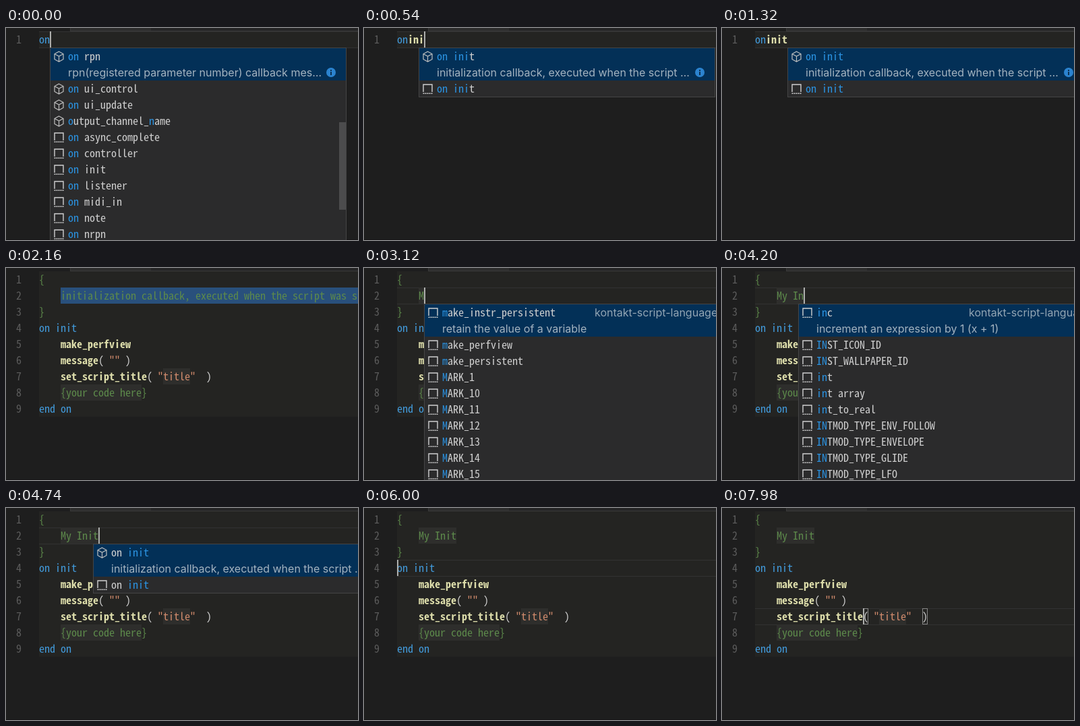
Write an HTML page with a canvas that moves like this. It is 522 px wide and 315 px high and loops after 8000 ms.

```html
<!DOCTYPE html>
<html lang="en">
<head>
<meta charset="utf-8">
<title>Snippet completion</title>
<style>
  html, body { margin: 0; width: 100%; height: 100%; overflow: hidden; background: #1e1e1e; }
  canvas { display: block; }
</style>
</head>
<body>
<canvas id="stage" width="522" height="315"></canvas>
<script>
const ctx = document.getElementById("stage").getContext("2d");
const W = 522, H = 315, LOOP = 8000;
const LEFT = 49, TOP = 5, CHAR = 8, LINE = 24, BASELINE = 18;
const MONO = '"Noto Sans Mono CJK JP", "Noto Sans Mono", monospace';
const SANS = "16px Inter, Roboto, sans-serif";
const BLUE = "#429bdc", GREEN = "#5d8a4b", YELLOW = "#dcdcaa", ORANGE = "#d18b6c", PLAIN = "#d0d0d0";

// Pick the size whose character advance is exactly one cell.
ctx.font = `100px ${MONO}`;
const monoSize = CHAR * 100 / ctx.measureText("0").width;

const colX = col => LEFT + col * CHAR;
const rowY = row => TOP + row * LINE;

// In item names "|" toggles match highlighting (on at the start); "@" asks for the cube icon.
const initDetail = "initialization callback, executed when the script …";
const source = "kontakt-script-language";
const popups = {
  on: {
    detail: "rpn(registered parameter number) callback mes…", info: true, scroll: true,
    items: ["@on| rpn", "@on| ui_control", "@on| ui_update", "@o|utput_channel_|n|ame",
      "on| async_complete", "on| controller", "on| init", "on| listener", "on| midi_in",
      "on| note", "on| nrpn"]
  },
  oni: { detail: initDetail, info: true, items: ["@on i|nit", "on i|nit", "on| m|i|di_in", "@on| u|i|_control"] },
  onin: { detail: initDetail, info: true, items: ["@on in|it", "on in|it", "on| midi_|in"] },
  onini: { detail: initDetail, info: true, items: ["@on ini|t", "on ini|t"] },
  oninit: { detail: initDetail, info: true, items: ["@on init", "on init"] },
  M: {
    detail: "retain the value of a variable", source,
    items: ["m|ake_instr_persistent", "m|ake_perfview", "m|ake_persistent", "M|ARK_1", "M|ARK_10",
      "M|ARK_11", "M|ARK_12", "M|ARK_13", "M|ARK_14", "M|ARK_15"]
  },
  I: {
    detail: "if statement", source,
    items: ["i|f", "i|gnore_controller", "i|gnore_event", "i|gnore_midi", "i|n_range", "i|nc",
      "I|NST_ICON_ID", "I|NST_WALLPAPER_ID", "i|nt", "i|nt array"]
  },
  In: {
    detail: "increment an expression by 1 (x + 1)", source,
    items: ["in|c", "IN|ST_ICON_ID", "IN|ST_WALLPAPER_ID", "in|t", "in|t array", "in|t_to_real",
      "IN|TMOD_TYPE_ENV_FOLLOW", "IN|TMOD_TYPE_ENVELOPE", "IN|TMOD_TYPE_GLIDE", "IN|TMOD_TYPE_LFO"]
  },
  Ini: { detail: initDetail, info: true, items: ["@|on |ini|t", "|on |ini|t"] },
  Init: { detail: initDetail, info: true, items: ["@|on |init", "|on |init"] }
};

// Each step overrides part of the state from its time on.
const steps = [
  [0, { word: "on", row: 0, col: 2, caret: true, popup: "on", left: 2 }],
  [60, { word: "oni", col: 3, popup: "oni" }],
  [120, { left: 3 }],
  [300, { word: "onin", col: 4, popup: "onin" }],
  [360, { left: 4 }],
  [540, { word: "onini", col: 5, popup: "onini" }],
  [600, { left: 5 }],
  [780, { word: "oninit", col: 6, popup: "oninit" }],
  [840, { left: 6 }],
  [1260, { caret: false }],
  [1680, { caret: true }],
  [2160, {
    expanded: true, selected: true, row: 1, caret: false, popup: null,
    comment: "initialization callback, executed when the script was started"
  }],
  [3000, { comment: "M", selected: false, col: 5, caret: true }],
  [3060, { popup: "M", left: 5 }],
  [3420, { comment: "My", col: 6, popup: null }],
  [3660, { comment: "My ", col: 7 }],
  [3960, { comment: "My I", col: 8 }],
  [4020, { popup: "I", left: 8 }],
  [4200, { comment: "My In", col: 9, popup: "In" }],
  [4260, { left: 9 }],
  [4500, { comment: "My Ini", col: 10, popup: "Ini" }],
  [4560, { left: 10 }],
  [4740, { comment: "My Init", col: 11, popup: "Init" }],
  [4800, { left: 11 }],
  [5220, { row: 2, col: 0, popup: null }],
  [5700, { caret: false }],
  [6000, { row: 3, caret: true }],
  [6180, { row: 4 }],
  [6420, { row: 5 }],
  [6840, { row: 6 }],
  [7140, { col: 1 }]
];

function stateAt(t) {
  const state = Object.assign({}, ...steps.filter(([time]) => time <= t).map(step => step[1]));
  if (t >= 7500) {
    const repeats = Math.floor((t - 7500) / 60) + 1;
    state.col = 1 + Math.round(repeats * 19 / 9);
  }
  return state;
}

function rect(x, y, w, h, color) {
  ctx.fillStyle = color;
  ctx.fillRect(x, y, w, h);
}

function frame(x, y, w, h, color) {
  ctx.strokeStyle = color;
  ctx.lineWidth = 1;
  ctx.strokeRect(x + 0.5, y + 0.5, w - 1, h - 1);
}

function text(str, x, y, color, font) {
  ctx.font = font;
  ctx.fillStyle = color;
  ctx.fillText(str, x, y + BASELINE);
}

const mono = (str, x, y, color, bold = false) =>
  text(str, x, y, color, `${bold ? "bold " : ""}${monoSize}px ${MONO}`);

// Draws [string, color] runs on one editor line.
function codeLine(row, col, ...runs) {
  for (const [str, color] of runs) {
    mono(str, colX(col), rowY(row), color, color === YELLOW);
    col += str.length;
  }
}

function cubeIcon(x, y) {
  ctx.strokeStyle = "#c0c0c0";
  ctx.lineWidth = 1.2;
  ctx.stroke(new Path2D(`M${x} ${y - 7.5}l6.5 3.5v8l-6.5 3.5l-6.5 -3.5v-8z
    m-6.5 3.5l6.5 3.5l6.5 -3.5m-6.5 3.5v8`));
}

function snippetIcon(x, y) {
  ctx.strokeStyle = "#d0d0d0";
  ctx.lineWidth = 1.4;
  ctx.stroke(new Path2D(`M${x - 6.5} ${y + 4.5}v-11h13v11`));
  for (let i = 0; i < 5; i++) rect(x - 7 + i * 3, y + 6, 2, 1.5, "#d0d0d0");
}

function infoIcon(x, y) {
  ctx.beginPath();
  ctx.arc(x, y, 7, 0, Math.PI * 2);
  ctx.fillStyle = "#2b83cf";
  ctx.fill();
  rect(x - 1, y - 4, 2, 2, "#0b3052");
  rect(x - 1, y - 1, 2, 5, "#0b3052");
}

function drawPopup({ items, detail, info, scroll, source }, x, y) {
  const width = 440, height = (items.length + 1) * LINE + 2;
  rect(x, y, width, height, "#2b2b2c");
  rect(x, y + 1, width, 2 * LINE, "#033057");
  items.forEach((item, i) => {
    const top = y + 1 + (i ? i + 1 : 0) * LINE;
    const cube = item.startsWith("@");
    (cube ? cubeIcon : snippetIcon)(x + 13.5, top + 12.5);
    let textX = x + 27;
    item.replace("@", "").split("|").forEach((part, j) => {
      mono(part, textX, top, j % 2 ? PLAIN : "#2b93e2");
      textX += part.length * CHAR;
    });
  });
  if (source) text(source, x + 253, y + 1, "#93a5b4", SANS);
  text(detail, x + 27, y + 1 + LINE, "#a4b3c0", SANS);
  if (info) infoIcon(x + 417, y + 37);
  if (scroll) rect(x + 429, 140, 10, 130, "#4c4c4d");
  frame(x, y, width, height, "#454545");
}

function drawSnippet({ comment, selected }) {
  if (selected) rect(colX(4), rowY(1), W, LINE, "#29507c");
  else rect(colX(4), rowY(1), comment.length * CHAR, LINE, "#2e2e2c");
  rect(colX(23), rowY(6), 5 * CHAR, LINE, "#2e2e2c");
  rect(colX(4), rowY(7), 15 * CHAR, LINE, "#2e2e2c");

  codeLine(0, 0, ["{", GREEN]);
  codeLine(1, 4, [comment, GREEN]);
  codeLine(2, 0, ["}", GREEN]);
  codeLine(3, 0, ["on init", BLUE]);
  codeLine(4, 4, ["make_perfview", YELLOW]);
  codeLine(5, 4, ["message", YELLOW], ["( ", PLAIN], ['""', ORANGE], [" )", PLAIN]);
  codeLine(6, 4, ["set_script_title", YELLOW], ["( ", PLAIN], ['"title"', ORANGE], ["  )", PLAIN]);
  codeLine(7, 4, ["{your code here}", GREEN]);
  codeLine(8, 0, ["end on", BLUE]);
}

function draw(t) {
  const state = stateAt(t);
  const { row, col, popup } = state;
  const lineCount = state.expanded ? 9 : 1;

  rect(0, 0, W, H, "#1e1e1e");
  rect(96, 0, W, 4, "#252526");
  rect(96, 0, 119, 4, "#2d2d2d");
  rect(95, 4, W, 1, "#3a3a3a");
  rect(95, 0, 1, 5, "#3a3a3a");
  rect(0, H - 1, W, 1, "#171516");

  rect(LEFT, TOP, W, lineCount * LINE, "#242422");
  for (let i = 0; i < lineCount; i++) mono(String(i + 1), 15, rowY(i), "#5c5c5c");
  if (!state.selected) {
    rect(LEFT, rowY(row), W, 1, "#323232");
    rect(LEFT, rowY(row + 1), W, 1, "#323232");
  }

  if (state.expanded) drawSnippet(state);
  else codeLine(0, 0, ["on", BLUE], [state.word.slice(2), YELLOW]);

  if (row === 6 && col === 20) {
    for (const bracket of [20, 31]) frame(colX(bracket), rowY(6), CHAR, LINE, "#888888");
  }
  if (state.caret) rect(colX(col), rowY(row), 2, LINE, "#aeafad");
  if (popup) drawPopup(popups[popup], colX(state.left), rowY(row + 1));
}

const start = performance.now();
function tick() {
  draw((performance.now() - start) % LOOP);
  requestAnimationFrame(tick);
}
tick();
</script>
</body>
</html>
```
